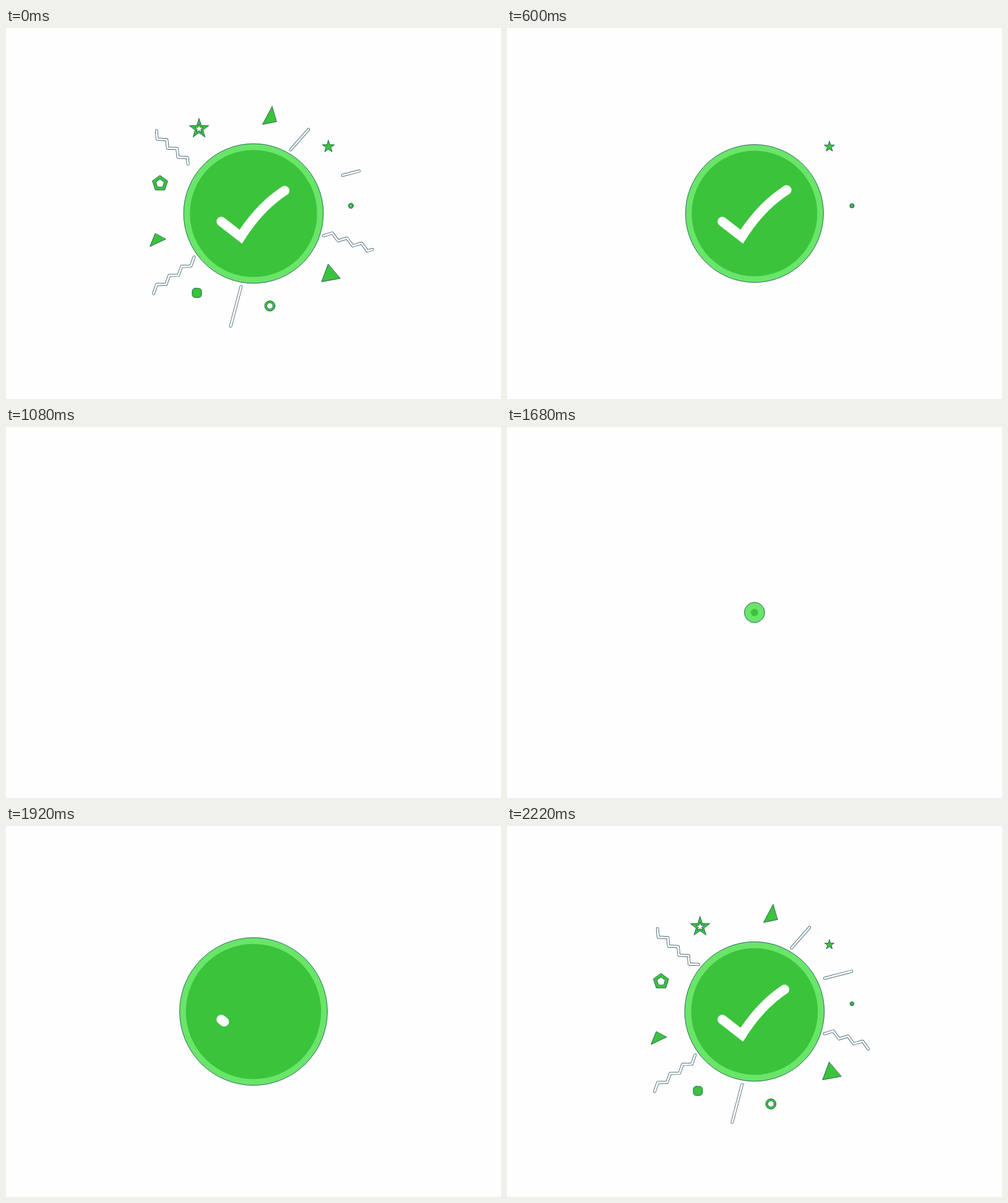
Recreate the animation shown at these times as an HTML page with a canvas. Size 800 px wide and 600 px high, loop 2.25 s.

```html
<!DOCTYPE html>
<html lang="en">
<head>
<meta charset="utf-8">
<title>Success</title>
<style>
html, body { margin: 0; width: 100%; height: 100%; overflow: hidden; background: #fefefe; }
canvas { display: block; }
</style>
</head>
<body>
<canvas id="stage" width="800" height="600"></canvas>
<script>
const ctx = document.getElementById('stage').getContext('2d');
const LOOP = 2250, STEP = 30;
const GREEN = '#3bc33b', LIGHT = '#69e569', EDGE = '#0d4650', PAPER = '#fefefe';

const clamp = v => Math.min(1, Math.max(0, v));
const part = (t, start, length) => clamp((t - start) / length);
const outPow = (u, n) => 1 - (1 - u) ** n;

// Interpolates [time, value] pairs.
function keys(t, list, ease = u => u) {
  if (t <= list[0][0]) return list[0][1];
  for (let i = 1; i < list.length; i++) {
    const [t0, a] = list[i - 1], [t1, b] = list[i];
    if (t < t1) return a + (b - a) * ease((t - t0) / (t1 - t0), i);
  }
  return list[list.length - 1][1];
}

// Section of a polyline between the fractions a and b of its length.
function section(pts, a, b) {
  const len = pts.slice(1).map((p, i) => Math.hypot(p[0] - pts[i][0], p[1] - pts[i][1]));
  const total = len.reduce((s, l) => s + l, 0);
  const from = a * total, to = b * total, out = [];
  const at = (i, d) => pts[i].map((v, k) => v + (pts[i + 1][k] - v) * d / len[i]);
  let pos = 0;
  len.forEach((l, i) => {
    if (pos + l > from && pos < to) {
      if (!out.length) out.push(at(i, Math.max(0, from - pos)));
      out.push(at(i, Math.min(l, to - pos)));
    }
    pos += l;
  });
  return out;
}

function trace(pts) {
  pts.forEach((p, i) => i ? ctx.lineTo(p[0], p[1]) : ctx.moveTo(p[0], p[1]));
}

function strokeLine(pts, width, color, join) {
  ctx.beginPath();
  trace(pts);
  ctx.lineWidth = width;
  ctx.strokeStyle = color;
  ctx.lineCap = 'round';
  ctx.lineJoin = join;
  ctx.stroke();
}

// Polyline that alternates between two steps.
function zigzag(x, y, a, b, count) {
  const pts = [[x, y]];
  for (let i = 0; i < count; i++) {
    const d = i % 2 ? b : a;
    pts.push([x += d[0], y += d[1]]);
  }
  return pts;
}

const grow = (start, length) => e => outPow(part(e, start, length), 2);
const trim = (start, length) => e => part(e, start, length);

const rays = [
  { pts: [[460, 197], [489, 164]], head: grow(1971, 210), tail: trim(2255, 200) },
  { pts: [[507, 248], [572, 231]],
    head: e => keys(e, [[1980, 0], [2070, .66], [2220, .77], [2250, .98], [2270, 1]]),
    tail: e => keys(e, [[2190, 0], [2220, .1], [2250, .57], [2290, 1]]) },
  { pts: [[380, 418], [363, 482.5]], head: grow(2075, 187), tail: trim(2300, 200) },
  { pts: zigzag(310, 224, [-15.5, -.6], [-1.2, -13.9], 8), head: grow(1965, 210), tail: trim(2220, 190) },
  { pts: zigzag(304, 370.5, [-5.2, 14.5], [-14.9, .3], 7), head: grow(2010, 215), tail: trim(2265, 200) },
  { pts: zigzag(513, 336, [14.3, -4.4], [9.4, 12.6], 7), head: grow(2070, 240), tail: trim(2330, 200) }
];

function drawRay(ray, e) {
  const a = ray.tail(e), b = ray.head(e);
  if (b <= a) return;
  const pts = section(ray.pts, a, b);
  strokeLine(pts, 4.6, '#173f55', 'round');
  strokeLine(pts, 3.2, PAPER, 'round');
}

function radial(n, r, inner = 0) {
  const count = inner ? n * 2 : n;
  return Array.from({ length: count }, (_, i) => {
    const q = inner && i % 2 ? r * inner : r;
    const ang = i / count * Math.PI * 2 - Math.PI / 2;
    return [Math.cos(ang) * q, Math.sin(ang) * q];
  });
}

// Each outline is drawn around the shape's own centre.
const poly = (...lists) => () => lists.forEach(pts => { trace(pts); ctx.closePath(); });
const ring = (r, hole) => () => [r, hole].forEach(q => {
  ctx.moveTo(q, 0);
  ctx.arc(0, 0, q, 0, Math.PI * 2);
});
const block = (h, corner) => () => ctx.roundRect(-h, -h, h * 2, h * 2, corner);

const bits = [
  { x: 426, y: 143, wave: 0, path: poly([[4, -16], [-11.5, 13], [11, 8.5]]) },
  { x: 426.5, y: 449.5, wave: 0, path: ring(8.4, 5) },
  { x: 312, y: 163, wave: 1, path: poly(radial(5, 16.5, .4), radial(5, 7.2, .42)) },
  { x: 249, y: 251.5, wave: 1, path: poly(radial(5, 13), radial(5, 7)) },
  { x: 525, y: 397, wave: 1, path: poly([[-4.5, -15], [-15, 13.5], [15, 8]]) },
  { x: 245, y: 343, wave: 2, path: poly([[-4, -10.5], [-12.5, 10.5], [13, -1.5]]) },
  { x: 308.5, y: 428.5, wave: 2, path: block(7.6, 5) },
  { x: 521, y: 192, wave: 3, path: poly(radial(5, 12.3, .4)) },
  { x: 557.5, y: 287.5, wave: 3, path: ring(5, 2) }
];

function drawBit(bit, e, x) {
  const scale = outPow(part(e, 1925 + bit.wave * 75, 170), 2) *
    (1 - part(x, 322 + bit.wave * 73, 110) ** 2);
  if (scale < .02) return;
  ctx.save();
  ctx.translate(bit.x, bit.y);
  ctx.scale(scale, scale);
  ctx.beginPath();
  bit.path();
  ctx.fillStyle = GREEN;
  ctx.fill('evenodd');
  ctx.lineWidth = .8 / scale;
  ctx.lineJoin = 'miter';
  ctx.strokeStyle = EDGE;
  ctx.stroke();
  ctx.restore();
}

function badgeScale(e, x) {
  const swing = [[1660, 0], [1890, 1.08], [2070, .946], [2235, 1.013], [2400, 1]];
  const ease = (u, i) => i === 1 ? Math.sin(u * Math.PI / 2) : (1 - Math.cos(u * Math.PI)) / 2;
  const k = part(x, 905, 170);
  return Math.max(0, keys(e, swing, ease) * (1 - k * k * (2 * k - 1)));
}

function disc(r, color, edge) {
  if (r <= 0) return;
  ctx.beginPath();
  ctx.arc(400, 300, r, 0, Math.PI * 2);
  ctx.fillStyle = color;
  ctx.fill();
  if (!edge) return;
  ctx.lineWidth = .8;
  ctx.strokeStyle = edge;
  ctx.stroke();
}

const tick = [[348, 313]];
for (let i = 0; i <= 40; i++) {
  const u = i / 40, v = 1 - u;
  tick.push([
    v * v * 379.5 + 2 * u * v * 411 + u * u * 452,
    v * v * 337.5 + 2 * u * v * 288 + u * u * 262
  ]);
}

function draw(t) {
  // Clocks for the entrance, which runs past the loop point, and the exit.
  const e = t < 1380 ? t + LOOP : t, x = e - LOOP;
  ctx.fillStyle = PAPER;
  ctx.fillRect(0, 0, 800, 600);
  rays.forEach(ray => drawRay(ray, e));
  bits.forEach(bit => drawBit(bit, e, x));
  disc(111.5 * badgeScale(e, x), LIGHT, EDGE);
  disc(101.5 * badgeScale(e - 12, x), GREEN);
  const head = outPow(part(e, 1914, 440), 3);
  const tail = part(x, 735, 233) ** 2;
  if (head > tail) strokeLine(section(tick, tail, head), 15.5, '#fff', 'miter');
}

const begin = performance.now();
function frame() {
  const t = (performance.now() - begin) % LOOP;
  draw(Math.floor(t / STEP) * STEP);
  requestAnimationFrame(frame);
}
frame();
</script>
</body>
</html>
```
